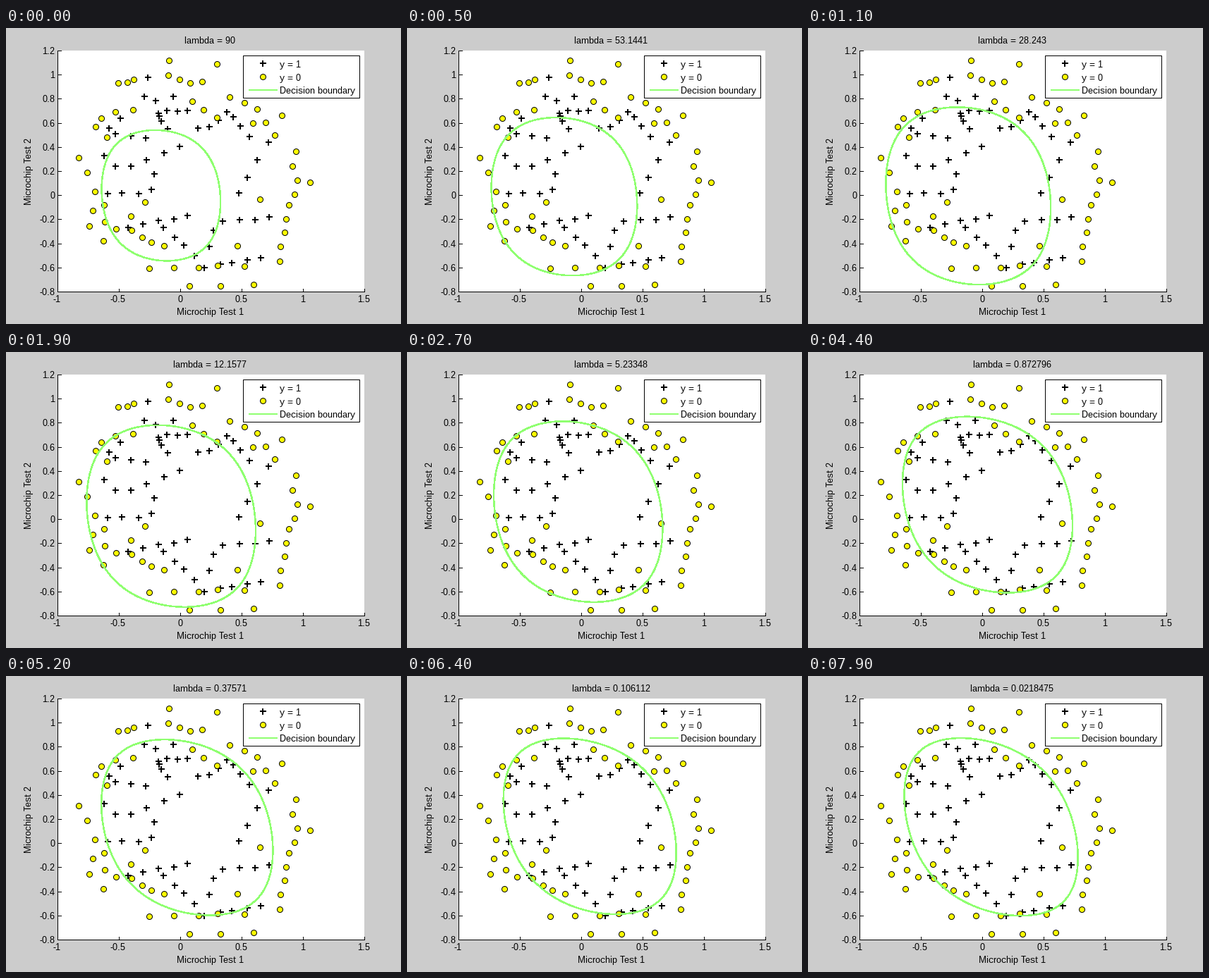
Animation, 560 px wide and 420 px high, one loop 8000 ms. Source, as a matplotlib script:

```python
import numpy as np
import matplotlib.pyplot as plt
from matplotlib.animation import FuncAnimation
from matplotlib.patches import Rectangle

W, H, DPI = 560, 420, 100
FRAMES, STEP_MS = 80, 100
PX = 72 / DPI
L, R, T, B = 73, 507.5, 32, 374
GREEN = "#8fff70"

plt.rcParams.update({
    "font.family": "Liberation Sans",
    "font.size": 13 * PX,
    "text.hinting": "native",
    "text.hinting_factor": 1,
    "axes.unicode_minus": False,
})
rng = np.random.default_rng(4)


def trail(n, *corners):
    """n evenly spaced points along a polyline, slightly scattered."""
    x, y = np.reshape(corners, (-1, 2)).T
    d = np.append(0, np.cumsum(np.hypot(np.diff(x), np.diff(y))))
    at = np.linspace(0, d[-1], n)
    pts = np.column_stack([np.interp(at, d, x), np.interp(at, d, y)])
    return pts + rng.normal(0, 0.008, pts.shape)


passed = np.vstack([
    trail(5, .2, -.6, .67, -.52),
    trail(4, -.14, -.28, .13, -.51),
    trail(5, -.42, -.26, .06, -.16),
    trail(6, .23, -.41, .3, -.23, .73, -.18),
    trail(4, .47, .01, .72, .44),
    trail(7, .55, .49, .4, .71, .3, .58, .14, .55),
    trail(7, .05, .7, -.21, .69, -.1, .54),
    trail(4, -.05, .82, -.29, .79, -.27, .96),
    trail(5, -.48, .63, -.6, .54, -.28, .48),
    trail(6, -.63, .33, -.5, .2, -.01, .4),
    trail(5, -.59, .01, -.25, .01, -.21, .17),
])
failed = np.vstack([
    trail(5, -.6, .49, -.73, .62, -.4, .71),
    trail(3, -.51, .92, -.38, .95),
    trail(4, -.1, .99, .18, .93),
    trail(2, -.08, 1.11, .29, 1.09),
    trail(3, .1, .78, .3, .64),
    trail(5, .4, .82, .62, .73, .77, .5),
    trail(2, .6, .6, .82, .66),
    trail(9, .93, .36, .95, .04, .87, -.1, .81, -.55),
    trail(5, .52, -.59, -.24, -.61),
    trail(3, .08, -.75, .59, -.75),
    trail(5, -.83, .31, -.7, .1, -.74, -.26),
    trail(6, -.61, -.07, -.62, -.4, -.29, -.06),
    trail(4, -.41, -.31, -.13, -.42),
    trail(3, .47, -.42, .63, -.03, 1.07, .1),
])

# extents of the boundary over time: step, left, right, bottom, top
KEYS = np.array([
    [0, -.64, .33, -.545, .54],
    [11, -.785, .56, -.742, .73],
    [18, -.767, .61, -.732, .775],
    [27, -.712, .665, -.688, .812],
    [36, -.667, .71, -.635, .837],
    [52, -.642, .757, -.598, .86],
    [79, -.635, .782, -.602, .872],
])
key_t, key_v = KEYS[:, 0], KEYS[:, 1:]
slope = np.gradient(key_v, key_t, axis=0, edge_order=2)


def extents(i):
    """Cubic Hermite interpolation between the keys."""
    k = min(np.searchsorted(key_t, i, "right") - 1, len(key_t) - 2)
    h = key_t[k + 1] - key_t[k]
    s = (i - key_t[k]) / h
    ease = s * s * (3 - 2 * s)
    return (key_v[k] + ease * (key_v[k + 1] - key_v[k])
            + h * s * (1 - s) * ((1 - s) * slope[k] - s * slope[k + 1]))


def boundary(i, square=0.022):
    """A slightly squared ellipse that leans over more and more."""
    left, right, bottom, top = extents(i)
    a = np.linspace(0, 2 * np.pi, 181)
    b = a - 0.09 - 0.003 * i
    x = (np.cos(a) + square * np.cos(3 * a)) / (1 + square)
    y = (np.sin(b) - square * np.sin(3 * b)) / (1 + square)
    # the third harmonic with reversed sign flattens the four sides
    x = (np.cos(a) - square * np.cos(3 * a)) / (1 - square)
    y = (np.sin(b) + square * np.sin(3 * b)) / (1 - square)
    return ((left + right + (right - left) * x) / 2,
            (bottom + top + (top - bottom) * y) / 2)


fig = plt.figure(figsize=(W / DPI, H / DPI), dpi=DPI, facecolor="#cccccc")
ax = fig.add_axes([L / W, 1 - B / H, (R - L) / W, (B - T) / H])
ax.set(xlim=(-1, 1.5), ylim=(-0.8, 1.2), xticks=[], yticks=[])
ax.autoscale(False)
ax.spines[["top", "right"]].set_visible(False)
ax.spines[["left", "bottom"]].set_linewidth(PX)


def put(x, y, s, ha="left", **kw):
    return fig.text(x / W, 1 - y / H, s, ha=ha, va="baseline", **kw)


def stroke(xs, ys, color="k", width=1, z=5):
    fig.add_artist(plt.Line2D(
        np.array(xs) / W, 1 - np.array(ys) / H, color=color, lw=width * PX,
        antialiased=False, zorder=z, solid_capstyle="butt",
        transform=fig.transFigure))


PLUS = dict(marker="+", ms=9 * PX, mew=2 * PX, color="k", ls="", antialiased=False)
DISC = dict(marker="o", ms=8 * PX, mew=PX, mfc="#ffff00", mec="k", ls="",
            antialiased=False)
ax.plot(*passed.T, **PLUS)
ax.plot(*failed.T, **DISC)

# ticks and labels
for v in np.arange(-2, 4) / 2:
    x = L + (v + 1) / 2.5 * (R - L)
    stroke([x, x], [B, B - 4])
    put(x - (1.5 if v < 0 else 0), 389, f"{v:g}", "center")
for v in np.arange(-4, 7) / 5:
    y = B - (v + 0.8) / 2 * (B - T)
    stroke([L, L + 5], [y, y])
    put(69.5, y + 5, f"{v:g}", "right")
put(289, 407, "Microchip Test 1", "center")
put(36, 203, "Microchip Test 2", "center", rotation=90, rotation_mode="anchor")
title = put(289, 22, "", "center")

# legend
fig.add_artist(Rectangle((336 / W, 1 - 99 / H), 165 / W, 60 / H, fc="w", ec="k",
                         lw=PX, zorder=6, transform=fig.transFigure))
for y, style in ((50, PLUS), (69, DISC)):
    fig.add_artist(plt.Line2D([364 / W], [1 - y / H], zorder=7,
                              transform=fig.transFigure, **style))
stroke([344, 385], [88, 88], GREEN, 1.5, 7)
for y, s in ((56, "y = 1"), (75, "y = 0"), (93, "Decision boundary")):
    put(388, y, s, zorder=7)

curve, = ax.plot([], [], color=GREEN, lw=1.5 * PX, antialiased=False, zorder=4)


def update(i):
    curve.set_data(*boundary(i))
    title.set_text(f"lambda = {90 * 0.9 ** i:g}")
    return curve, title


anim = FuncAnimation(fig, update, frames=FRAMES, interval=STEP_MS,
                     init_func=lambda: [], repeat=True, repeat_delay=0, blit=False)
plt.show()
```
